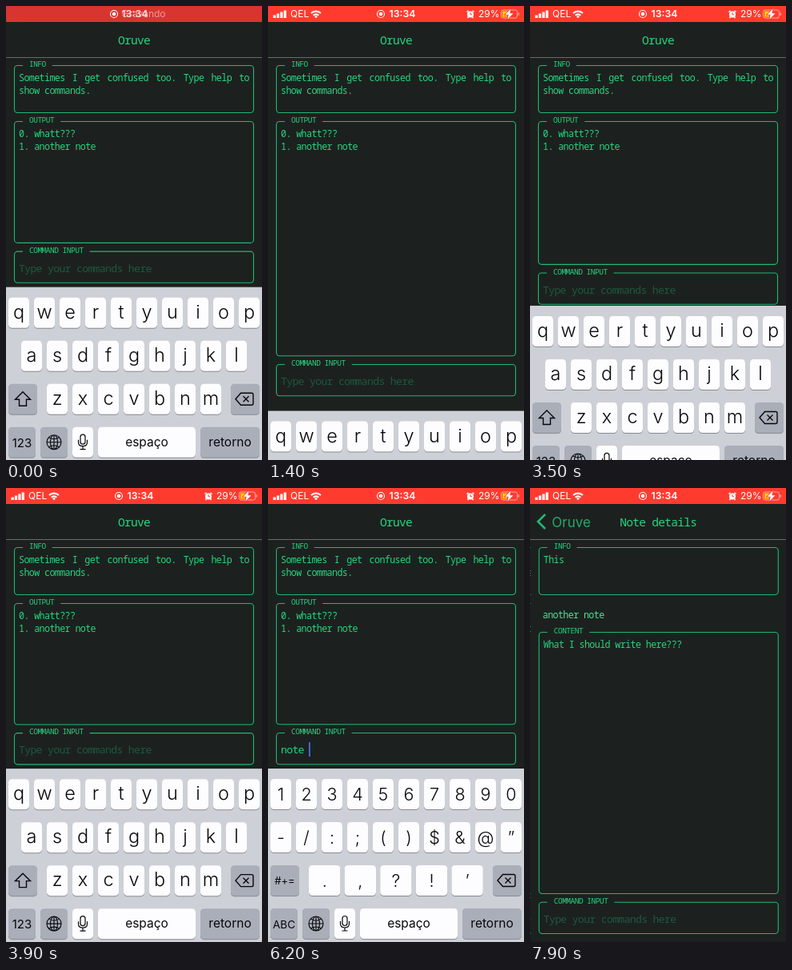
Animation of 320x568 px, one loop 8 s. Source, as an HTML page with a canvas:

```html
<!DOCTYPE html>
<html lang="en">
<head>
<meta charset="utf-8">
<title>Terminal notes</title>
<style>
html, body { margin: 0; width: 100%; height: 100%; overflow: hidden; background: #1c211f; }
canvas { display: block; width: 320px; height: 568px; }
</style>
</head>
<body>
<canvas id="stage" width="320" height="568"></canvas>
<script>
const c = document.getElementById('stage').getContext('2d');
const LOOP = 8000, APP = 'Oruve', CARRIER = 'QEL';
const BG = '#1c211f', GREEN = '#27d580', LINE = '#22b772', HINT = '#1f5740';
const WHITE = '#fdfcfe', GRAY = '#a9aeb9', INK = '#08080a';
const SANS = 'Inter, Roboto, sans-serif';
const MONO = '"Noto Sans Mono", "DejaVu Sans Mono", monospace';

// Key presses: [label, time]
const PRESSES = [['n', 4250], ['o', 4500], ['t', 4720], ['e', 4930], ['space', 5250],
  ['123', 5750], ['1', 6500], ['return', 7020]];
const HOLD = 120, SEND = 7200, PUSH = 7350;

const mix = (a, b, p) => a + (b - a) * p;
const clamp = v => Math.max(0, Math.min(1, v));

// Critically damped spring from 0 to 1
function spring(t, start) {
  const x = Math.max(0, t - start) * 0.015;
  return 1 - (1 + x) * Math.exp(-x);
}

// 0 = keyboard up, 1 = keyboard hidden
const hidden = t => t < 3000 ? spring(t, 1233) : t < 7000 ? 1 - spring(t, 3250) : spring(t, SEND + 30);

function faded(alpha, draw) {
  c.save();
  c.globalAlpha *= clamp(alpha);
  draw();
  c.restore();
}

function text(s, x, y, size, color, align = 'left', weight = 400) {
  c.font = `${weight} ${size}px ${SANS}`;
  c.letterSpacing = c.wordSpacing = '0px';
  c.textAlign = align;
  c.fillStyle = color;
  c.fillText(s, x, y);
}

// Narrow terminal text: each cell is 0.4 of the nominal size
function term(s, x, y, size = 16, color = GREEN, gap = 0) {
  c.font = `500 ${size * 0.73}px ${MONO}`;
  c.letterSpacing = c.wordSpacing = '0px';
  c.letterSpacing = size * 0.4 - c.measureText('0').width + 'px';
  c.wordSpacing = gap + 'px';
  c.textAlign = 'left';
  c.fillStyle = color;
  c.fillText(s, x, y);
}

function stroke(path, color, width) {
  c.strokeStyle = color;
  c.lineWidth = width;
  c.stroke(path);
}

function box(label, top, bottom) {
  const p = new Path2D();
  p.roundRect(10.5, top, 299, bottom - top, 4);
  stroke(p, LINE, 1.1);
  c.fillStyle = BG;
  c.fillRect(21, top - 2, label.length * 5.2 + 16, 4);
  term(label, 29, top + 1.5, 13);
}

function commandBox(top, value, t) {
  box('COMMAND INPUT', top, top + 39.2);
  const y = top + 25.5;
  term(value || 'Type your commands here', 16, y, 18, value ? GREEN : HINT);
  if (t > 4000 && t < SEND) {
    const blink = 0.5 + 1.2 * Math.cos((t - 50) * Math.PI / 500);
    faded(blink, () => {
      c.fillStyle = '#4a6be0';
      c.fillRect(15 + value.length * 7.2, y - 14, 1.8, 18);
    });
  }
}

function typed(t) {
  if (t >= SEND) return '';
  return PRESSES.filter(([k, at]) => at <= t && (k.length === 1 || k === 'space'))
    .map(([k]) => k === 'space' ? ' ' : k).join('');
}

function notesPage(t) {
  const drop = 211.5 * hidden(t - 14) + 0.6 * (1 - spring(t, 0));
  box('INFO', 74.5, 133.5);
  term('Sometimes I get confused too. Type help to', 16, 93.5, 16, GREEN, 2.74);
  term('show commands.', 16, 109.5);
  box('OUTPUT', 144.5, 295.8 + drop);
  term('0. whatt???', 16, 163.5);
  term('1. another note', 16, 179.5);
  commandBox(306.5 + drop, typed(t), t);
}

function detailsPage(t) {
  box('INFO', 74.5, 133.5);
  term('This'.slice(0, Math.max(0, Math.floor((t - 7690) / 50))), 16, 93.5);
  term('another note', 15, 162.5, 16, '#3fe796');
  box('CONTENT', 180.5, 507.5);
  term('What I should write here???', 16, 199.5);
  commandBox(518.3, '', 0);
}

function pages(t, p) {
  c.save();
  c.beginPath();
  c.rect(0, 65, 320, 503);
  c.clip();
  c.save();
  c.translate(-96 * p, 0);
  notesPage(t);
  c.restore();
  if (p > 0) {
    c.fillStyle = `rgba(0,0,0,${0.1 * p})`;
    c.fillRect(0, 65, 320, 503);
    c.translate(320 * (1 - p), 0);
    c.fillStyle = BG;
    c.fillRect(0, 65, 320, 503);
    detailsPage(t);
  }
  c.restore();
}

function header(p) {
  c.fillStyle = '#656b68';
  c.fillRect(0, 64, 320, 1);
  faded(1 - p * 1.6, () => term(APP, mix(140, 27, p), 48, 20));
  if (p <= 0) return;
  faded(p * 1.6 - 0.6, () => {
    text(APP, mix(140, 27, p), 48.5, 17, '#27a86c');
    stroke(new Path2D('M19 33L10 42L19 51'), '#27b874', 2.6);
  });
  faded(p * 1.4 - 0.4, () => term('Note details', mix(260, 112, p), 48, 20));
}

function statusBar(t) {
  const m = clamp(t / 350);
  const red = [[216, 255], [53, 59], [49, 48]].map(([a, b]) => Math.round(mix(a, b, m)));
  c.fillStyle = `rgb(${red})`;
  c.fillRect(0, 0, 320, 20);

  const x = mix(135, 141, m);
  const ring = new Path2D();
  ring.arc(x, 10, 4.5, 0, 7);
  stroke(ring, '#fff', 1.1);
  c.fillStyle = '#fff';
  c.beginPath();
  c.arc(x, 10, 2.3, 0, 7);
  c.fill();
  faded(0.5 * (1 - m), () => text('Gravando', 172, 14.3, 12, '#fff', 'center'));
  faded(mix(0.8, 1, m), () => text('13:34', mix(161, 168, m), 14.3, 12.3, '#fff', 'center', 600));

  faded(m, () => {
    c.fillStyle = '#fff';
    for (let i = 0; i < 4; i++) c.fillRect(6.5 + i * 4.4, 11.5 - i * 2, 3.2, 3.5 + i * 2);
    text(CARRIER, 28, 14.3, 12, '#fff');
    for (const r of [4.6, 8.4]) {
      const wave = new Path2D();
      wave.arc(60, 15, r, -2.36, -0.78);
      stroke(wave, '#fff', 2.1);
    }
    c.fill(new Path2D('M60 15.3L58 13.2Q60 11.4 62 13.2Z'));

    c.beginPath();
    c.arc(253, 10.5, 4, 0, 7);
    c.fill();
    stroke(new Path2D('M248.5 7.5L250.5 5.8M257.5 7.5L255.5 5.8M250.5 13.5L249.5 15M255.5 13.5L256.5 15'), '#fff', 1.5);
    stroke(new Path2D('M253 8V10.7H255'), '#ff3b30', 1);
    text('29%', 263, 14.3, 12, '#fff');

    const cell = new Path2D();
    cell.roundRect(291.5, 5, 20, 10, 2.5);
    stroke(cell, '#ffaaa5', 1);
    c.fillStyle = '#ffaaa5';
    c.fillRect(312.7, 8.2, 1.2, 3.6);
    c.fillStyle = '#ffcc00';
    c.fillRect(293, 6.5, 6, 7);
    const bolt = new Path2D('M303.5 3.5L296.5 10.8H300.6L299.5 16.5L306.5 9.2H302.4Z');
    stroke(bolt, '#ff3b30', 1.6);
    c.fillStyle = '#fff';
    c.fill(bolt);
  });
}

function key(x, y, w, color, label = '', size = 23, baseline = 26) {
  c.fillStyle = '#878b92';
  c.beginPath();
  c.roundRect(x, y + 1, w, 38, 4.5);
  c.fill();
  c.fillStyle = color;
  c.beginPath();
  c.roundRect(x, y, w, 38, 4.5);
  c.fill();
  text(label, x + w / 2, y + baseline, size, INK, 'center', size > 20 ? 350 : 400);
}

function callout(x, y, w, label) {
  const left = Math.max(2, Math.min(x - 9, 318 - w - 18)), right = left + w + 18;
  c.fillStyle = WHITE;
  c.beginPath();
  c.roundRect(left, y - 54, w + 18, 44, 8);
  c.roundRect(x, y - 4, w, 42, 4.5);
  c.fill();
  c.beginPath();
  c.moveTo(left, y - 18);
  c.bezierCurveTo(left, y - 6, x, y - 8, x, y + 4);
  c.lineTo(x + w, y + 4);
  c.bezierCurveTo(x + w, y - 8, right, y - 6, right, y - 18);
  c.fill();
  text(label, (left + right) / 2, y - 20, 33, INK, 'center', 350);
}

function keyIcons() {
  const globe = new Path2D('M51 545H69M60 536V554M53.5 539Q60 543 66.5 539M53.5 551Q60 547 66.5 551');
  for (const rx of [9, 4.5]) {
    globe.moveTo(60 + rx, 545);
    globe.ellipse(60, 545, rx, 9, 0, 0, 7);
  }
  stroke(globe, INK, 1.1);
  const mic = new Path2D('M90.5 542V545Q90.5 550 96 550T101.5 545V542M96 550V554M92.5 554H99.5');
  mic.roundRect(93, 535.5, 6, 12, 3);
  stroke(mic, INK, 1.2);
  stroke(new Path2D('M287 491L293.5 483.5H307Q309 483.5 309 485.5V496.5Q309 498.5 307 498.5H293.5ZM296.5 487.5L303.5 494.5M303.5 487.5L296.5 494.5'), INK, 1.4);
}

function keyboard(t) {
  const shift = 217 * hidden(t) + 0.7 * (1 - spring(t, 0));
  if (shift > 216.8) return;
  const numeric = t >= 5750 + HOLD;
  const held = (PRESSES.find(([, at]) => t >= at && t < at + HOLD) || [''])[0];
  c.save();
  c.translate(0, shift);
  c.fillStyle = '#cdd0d6';
  c.fillRect(0, 351, 320, 218);

  const wide = 39.4, popups = [];
  const rows = numeric
    ? [['1234567890', 3, 364, 26], ['-/:;()$&@”', 3, 418, 26], ['.,?!’', 51, 472, wide]]
    : [['qwertyuiop', 3, 364, 26], ['asdfghjkl', 19, 418, 26], ['zxcvbnm', 51, 472, 26]];
  for (const [chars, x0, y, w] of rows) {
    [...chars].forEach((ch, i) => {
      const x = x0 + i * (w === wide ? 44.6 : 32);
      key(x, y, w, WHITE, ch, numeric ? 21.5 : 23.5, numeric ? 27 : 26);
      if (ch === held) popups.push([x, y, w, ch]);
    });
  }

  key(3, 472, 36, GRAY, numeric ? '#+=' : '', 13, 24);
  if (!numeric) stroke(new Path2D('M21 482L11.5 491.5H16.5V499.5H25.5V491.5H30.5Z'), INK, 1.4);
  key(281, 472, 36, GRAY);
  key(3, 526, 34, held === '123' ? WHITE : GRAY, numeric ? 'ABC' : '123', numeric ? 13.5 : 15, 25);
  key(43, 526, 34, GRAY);
  key(83, 526, 26, WHITE);
  key(115, 526, 122, held === 'space' ? GRAY : WHITE, 'espaço', 15.5, 24);
  key(243, 526, 74, held === 'return' ? WHITE : GRAY, 'retorno', 15.5, 24);
  keyIcons();
  popups.forEach(p => callout(...p));
  c.restore();
}

function frame(now) {
  const t = now % LOOP;
  const p = spring(t, PUSH);
  c.fillStyle = BG;
  c.fillRect(0, 0, 320, 568);
  pages(t, p);
  header(p);
  keyboard(t);
  statusBar(t);
}

const begun = performance.now();
function tick() {
  frame(performance.now() - begun);
  requestAnimationFrame(tick);
}
tick();
</script>
</body>
</html>
```
